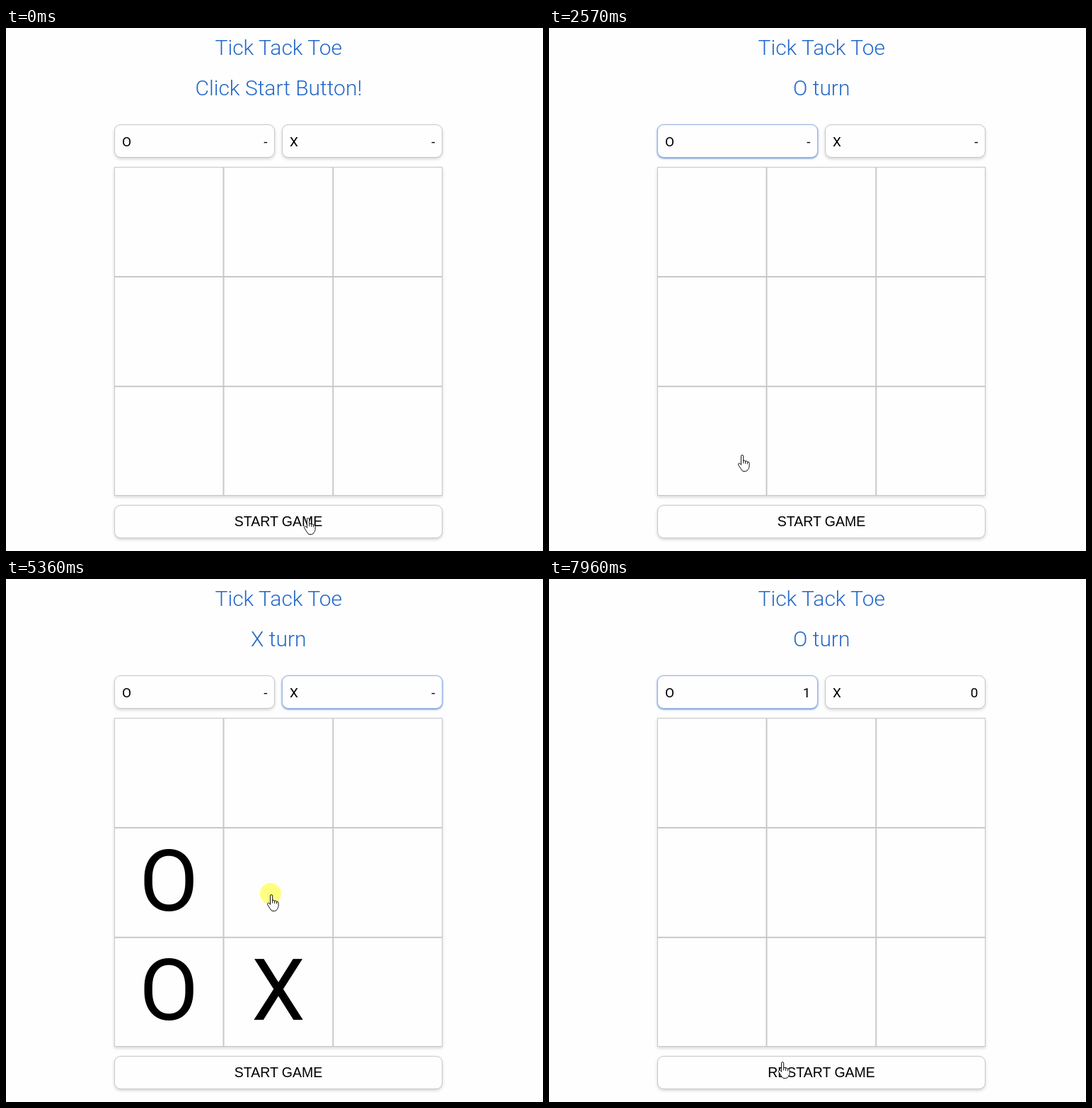
An HTML page that plays this animation: 759 px wide and 738 px high, repeating every 8 s.

```html
<!DOCTYPE html>
<html lang="en">
<head>
<meta charset="utf-8">
<title>Tick Tack Toe</title>
<style>
  html, body { margin: 0; width: 100%; height: 100%; overflow: hidden; background: #fefefe; }
  .box {
    position: absolute; box-sizing: border-box; background: #fefefe;
    border: 1px solid #c8c8cc; border-radius: 9px; box-shadow: 0 2px 4px rgba(0, 0, 0, .17);
  }
  .box.active { border-color: #9db7e2; box-shadow: 0 1px 3px rgba(25, 85, 190, .75); }
  #boxO { left: 153px; top: 136px; width: 227px; height: 46.5px; }
  #boxX { left: 390px; top: 136px; width: 227px; height: 46.5px; }
  #board { left: 153px; top: 196px; width: 464px; height: 463.5px; border-radius: 0; }
  #button { left: 153px; top: 673px; width: 464px; height: 46.5px; }
  svg { position: absolute; left: 0; top: 0; }
  text { font-family: Roboto, sans-serif; font-size: 19px; }
  .head { font-size: 30px; font-weight: 300; fill: #2468c8; }
  .mark { font-size: 121px; }
  .mid { text-anchor: middle; }
  .end { text-anchor: end; }
  #label { font-family: "Liberation Sans", Arial, sans-serif; font-size: 19.5px; }
  .cursor path { fill: #fff; stroke: #111; stroke-linejoin: round; stroke-linecap: round; }
</style>
</head>
<body>
<div class="box" id="boxO"></div>
<div class="box" id="boxX"></div>
<div class="box" id="board"></div>
<div class="box" id="button"></div>
<svg width="759" height="738" viewBox="0 0 759 738">
  <path d="M307.5 197V659M462.3 197V659M154 351H616M154 505.7H616" stroke="#c8c8c8" stroke-width="2"/>
  <text class="head mid" x="385.3" y="38">Tick Tack Toe</text>
  <text class="head mid" id="status" x="385.3" y="94.5"></text>
  <text x="164" y="166.5">O</text>
  <text x="401" y="166.5">X</text>
  <text class="end" id="scoreO" x="369.5" y="166.5"></text>
  <text class="end" id="scoreX" x="606.5" y="166.5"></text>
  <g id="marks"></g>
  <text class="mid" id="label" x="385" y="703"></text>
  <g class="cursor" id="cursor">
    <circle id="press" cx="-1" cy="-1" r="15" fill="#ff0" fill-opacity=".5"/>
    <g id="hand">
      <path d="M-1.5 14V2.2a1.6 1.6 0 0 1 3.2 0V8.6q1.4-1.3 2.9.6 1.6-1 2.8.9 2.6-.6 2.7 2v4.2q-.1 2.4-1.6 4.2-.9 3-4 3H2q-2.2 0-3.2-2.6L-5.3 14.6q-.8-2 .7-2.5 1.5-.3 3.1 1.9Z"/>
      <path d="M1.7 8.6V12M4.6 9.4V12.5M7.4 10.3V13" fill="none"/>
    </g>
    <path id="arrow" d="M.5.5V16.6L4.2 13.1 6.7 18.8 9.2 17.7 6.7 12.1H11.8Z"/>
  </g>
</svg>
<script>
const LOOP = 8000;
const $ = id => document.getElementById(id);

// Each entry: time, status, active side, marks by cell, scores, button label
const states = [
  [0, 'Click Start Button!', '', '         ', '--', 'START GAME'],
  [1000, 'O turn', 'O', '         ', '--', 'START GAME'],
  [3810, 'X turn', 'X', '      O  ', '--', 'START GAME'],
  [4360, 'O turn', 'O', '      OX ', '--', 'START GAME'],
  [5200, 'X turn', 'X', '   O  OX ', '--', 'START GAME'],
  [5440, 'O turn', 'O', '   OX OX ', '--', 'START GAME'],
  [6090, 'O win!', '', 'O  OX OX ', '10', 'RESTART GAME'],
  [7880, 'O turn', 'O', '         ', '10', 'RESTART GAME']
];

const presses = [[910, 1000], [3730, 3810], [4290, 4360], [5120, 5200],
                 [5360, 5440], [6010, 6090], [7800, 7880]];

const linear = p => p;
const smooth = p => p * p * (3 - 2 * p);
const easeOut = p => 1 - (1 - p) ** 2;

// Each entry: first step, last step, number of steps, target x, target y, easing
const home = [427, 691];
const moves = [
  [1860, 2630, 11, 269, 600, smooth],
  [2720, 2880, 3, 258, 590, easeOut],
  [3810, 4130, 5, 368, 580, smooth],
  [4360, 4510, 3, 307, 489, linear],
  [4590, 5050, 7, 262, 447, easeOut],
  [5200, 5360, 3, 375, 445, smooth],
  [5440, 5840, 6, 261, 315, smooth],
  [6620, 7080, 7, 320, 669, smooth],
  [7158, 7400, 4, 329, 692, easeOut],
  [7960, 7960, 1, 330, 681, linear]
];

const cells = [...Array(9).keys()].map(i => {
  const mark = document.createElementNS('http://www.w3.org/2000/svg', 'text');
  mark.setAttribute('class', 'mark mid');
  mark.setAttribute('x', 230.2 + 154.8 * (i % 3));
  mark.setAttribute('y', 313 + 154.5 * Math.floor(i / 3));
  return $('marks').appendChild(mark);
});

function cursorAt(t) {
  let [x, y] = home;
  for (const [start, end, count, toX, toY, ease] of moves) {
    if (t < start) break;
    const gap = (end - start) / (count - 1 || 1);
    const step = t >= end ? count : Math.floor((t - start) / gap) + 1;
    const p = ease(step / count);
    x += (toX - x) * p;
    y += (toY - y) * p;
  }
  return [x, y];
}

function showState([, status, side, marks, scores, label]) {
  $('status').textContent = status;
  $('boxO').classList.toggle('active', side === 'O');
  $('boxX').classList.toggle('active', side === 'X');
  $('scoreO').textContent = scores[0];
  $('scoreX').textContent = scores[1];
  $('label').textContent = label;
  cells.forEach((cell, i) => cell.textContent = marks[i].trim());
}

let shown;
function draw(t) {
  const state = states.findLast(s => s[0] <= t);
  if (state !== shown) showState(shown = state);
  const [x, y] = cursorAt(t);
  const overGap = y > 659 && y < 673;
  $('cursor').setAttribute('transform', `translate(${Math.round(x)} ${Math.round(y)})`);
  $('hand').style.display = overGap ? 'none' : '';
  $('arrow').style.display = overGap ? '' : 'none';
  $('press').style.display = presses.some(([on, off]) => t >= on && t < off) ? '' : 'none';
}

const began = performance.now();
function tick() {
  draw((performance.now() - began) % LOOP);
  requestAnimationFrame(tick);
}
tick();
</script>
</body>
</html>
```
